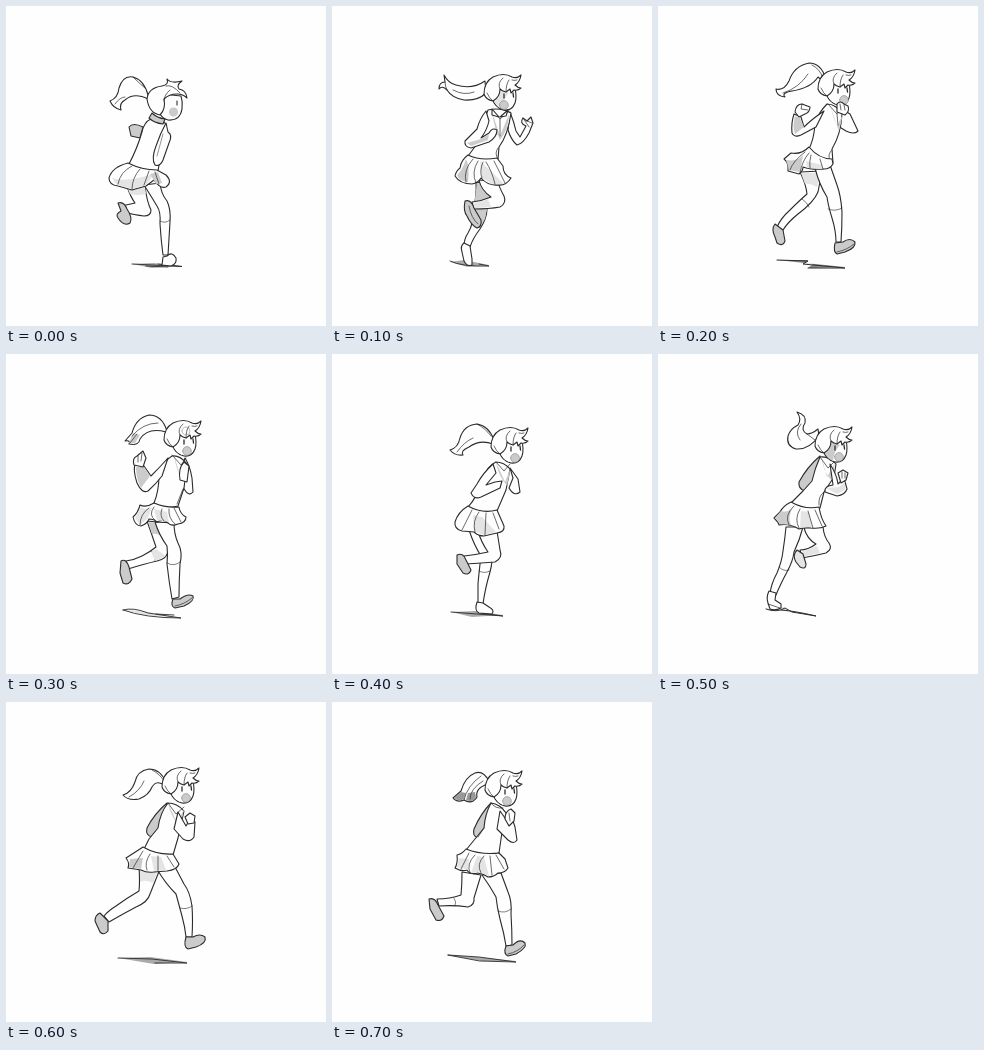
Recreate the animation shown at these times as an HTML page with a canvas. Size 320 by 320 pixels, loop 0.8 s.

```html
<!DOCTYPE html>
<html lang="en">
<head>
<meta charset="utf-8">
<title>Running girl</title>
<style>
  html, body { margin: 0; width: 100%; height: 100%; overflow: hidden; background: #fefefe; }
  canvas { display: block; width: 320px; height: 320px; }
</style>
</head>
<body>
<canvas id="stage" width="320" height="320"></canvas>
<script>
const ctx = document.getElementById('stage').getContext('2d');
const PAPER = '#fefefe', LINE = '#2b2b2b', GREY = '#cbcbcb', PALE = '#e4e4e4';
const STEP = 100;

// Closed shape with an inked outline.
function ink(d, fill = PAPER, width = 1.1) {
  tone(d, fill);
  line(d, width);
}

function tone(d, fill = GREY) {
  ctx.fillStyle = fill;
  ctx.fill(new Path2D(d));
}

function line(d, width = 0.7, color = LINE) {
  ctx.lineWidth = width;
  ctx.strokeStyle = color;
  ctx.stroke(new Path2D(d));
}

// Head in three-quarter view; mouth is its x, skin shades the near cheek.
function head(x, y, mouth, skin = PAPER) {
  ctx.save();
  ctx.translate(x, y);
  ink('M8 23Q11 33 20 35Q28 36 31 28Q33 22 31 13L13 10Z');
  tone('M9 24Q11 31 18 34Q19 24 25 18L15 14Z', skin);
  const ball = `M${mouth - 4.4} 30a4.4 4.4 0 1 0 8.8 0a4.4 4.4 0 1 0 -8.8 0`;
  tone(ball);
  line(ball, 0.5, '#777');
  line('M20 19L20 23M29 18L29.5 22', 1.3);
  ink('M0 19Q0 7 9 2Q20 -3 28 2Q33 4 37 0Q36 7 31 10Q34 13 37 13Q34 16 30 15L27 18L26 14L22 17Q18 16 16 14Q16 22 9 26Q2 25 0 19Z');
  line('M19 3Q13 8 16 14M3 18Q5 23 9 26M25 5Q22 9 22 17M28 5Q31 6 33 5');
  ctx.restore();
}

const poses = [
  () => {
    tone('M126 258L147 257L176 260L146 262Z', '#aaa');
    line('M126 258L176 260.5L152 258M140 260L162 261', 0.9);
    ink('M137 121Q127 116 123 121L125 130L134 132Z', GREY);
    ink('M121 180Q124 190 129 197Q120 199 115 200L117 206Q129 209 138 210Q145 210 145 204Q141 196 139 181Z');
    tone('M121 181L139 181L140 188Q130 190 124 188Z', PALE);
    ink('M112 197Q118 195 121 203Q127 212 124 217Q118 221 112 212Q109 208 115 205Z', GREY);
    ink('M138 179Q145 190 151 200Q155 206 154 218Q155 234 157 249L162 249Q163 232 164 216Q165 203 161 195Q155 188 154 177Z');
    line('M154 215Q159 218 164 214', 0.6);
    ink('M161 250Q166 245 170 252Q171 258 165 260L156 259L157 251Z');
    ink('M142 89Q138 74 127 71Q117 69 113 82Q112 92 104 95Q107 102 115 104Q113 97 119 94Q128 86 142 93Z');
    line('M109 98Q114 91 119 91M127 71Q133 77 140 83');
    ink('M145 113Q138 116 136 126Q131 143 123 158Q135 166 152 165L160 118Q153 111 145 113Z');
    ink('M122 157Q106 161 103 172Q103 179 112 180L126 184L140 180L148 174Q154 183 160 181Q167 176 160 169L151 164Q136 164 122 157Z');
    tone('M106 172Q118 176 136 171L148 168L140 179L126 183L111 179Z', PALE);
    tone('M144 168L152 166L156 177L150 178Z');
    line('M126 160Q114 166 112 178M134 163Q126 172 126 183M143 165L138 179M149 166L153 178');
    ink('M160 117Q154 128 150 140Q145 153 149 159Q154 161 157 154L163 137Q167 129 162 126Z');
    line('M157 128L151 150', 0.5);
    ink('M150 93Q151 111 162 114Q174 115 176 103Q177 96 175 90L156 88Z');
    tone('M163 105a4 4 0 1 0 9 2a4 4 0 1 0 -9 -2Z');
    line('M171 95L171 99', 1.1);
    ink('M141 93Q142 82 156 80Q163 79 161 73Q165 78 176 75Q170 79 173 83Q180 84 181 92Q177 88 171 88Q163 88 158 93Q160 103 154 109Q143 107 141 93Z');
    line('M160 80Q166 78 174 87M164 84Q158 89 158 95');
    ink('M146 107Q151 112 159 113L157 118Q148 117 143 112Z', GREY);
  },
  () => {
    tone('M118 256L132 254L157 259L136 261Z', '#aaa');
    line('M118 255Q130 261 157 260L147 258', 0.9);
    ink('M144 176Q145 190 141 205Q142 217 136 227Q132 233 132 240L138 241Q141 232 148 223Q155 212 155 203L161 180Z');
    tone('M145 177L160 180L155 203L153 213L147 222L141 214L142 200Z');
    ink('M132 237Q128 240 130 246L132 255Q135 261 140 259L140 253L138 240Z');
    ink('M147 174Q149 184 159 191Q150 195 140 196L142 203Q157 203 168 201Q175 197 172 190Q167 181 166 176Z');
    tone('M141 197Q149 196 156 193L159 201L143 202Z', PALE);
    ink('M133 195Q139 193 142 202L149 214Q150 221 145 222Q139 219 135 210Q131 205 133 195Z', GREY);
    line('M137 200Q139 212 146 218');
    ink('M154 87Q146 95 132 94Q120 92 115 84Q110 79 107 83Q107 76 113 76L112 69Q116 77 124 79Q140 84 153 75Z');
    line('M115 84Q113 80 113 76M121 84Q132 90 142 86', 0.7);
    ink('M178 106Q182 116 184 125L188 131L194 120Q187 117 191 112L195 115L199 111L201 117L197 127Q191 138 185 139Q179 134 176 124Z');
    line('M191 112L197 121M195 115L200 117');
    ink('M156 104Q150 119 148 134L136 150Q150 157 166 153L167 141Q176 129 179 107Q168 101 156 104Z');
    tone('M160 106L168 130L177 108Q177 123 168 134Q162 122 160 106Z');
    line('M161 105L168 113L177 105M168 113L168 130M166 142Q162 147 166 153');
    ink('M136 149Q129 154 128 162Q124 165 123 170Q128 178 140 178Q146 177 149 172Q156 180 166 179Q174 180 179 172Q171 169 171 160L165 152Q148 155 136 149Z');
    tone('M134 153Q138 160 136 176Q127 175 125 169Q130 165 134 153Z');
    tone('M148 155Q158 164 172 178L160 178L150 172Z', PALE);
    line('M141 153Q131 164 134 176M146 155Q139 166 144 177M151 156Q147 165 150 172M154 156Q160 165 163 178M162 155L173 177');
    ink('M154 105Q148 112 145 123L133 135Q132 141 139 142L157 136Q165 131 165 124Q160 121 157 127L149 132Q155 124 157 115Z');
    tone('M135 137L149 133L157 128L156 134L139 140Z');
    head(152, 69, 20, PALE);
    ink('M160 103L167 111L160 109ZM176 104L168 111L174 110Z');
  },
  () => {
    tone('M119 254L150 254L147 257L187 261L150 262L155 258Z', '#888');
    line('M119 254L150 255L145 258L187 262L150 262', 1);
    ink('M142 166Q148 178 149 188Q142 194 132 204Q123 212 119 221L125 224Q130 216 140 208Q156 196 160 186L164 165Z');
    tone('M143 167L163 167L159 181Q152 177 147 178Z', PALE);
    line('M144 193Q149 196 151 201', 0.6);
    ink('M117 218Q113 223 117 231L119 237Q125 241 127 235L125 224Z', GREY);
    ink('M157 162Q161 178 169 191Q170 199 174 212Q178 225 178 236L183 236Q184 222 184 206Q183 190 179 179L172 159Z');
    line('M170 203Q177 206 184 202', 0.6);
    ink('M177 237Q175 246 179 248L187 246Q198 242 197 236Q192 231 185 236Z', GREY);
    line('M179 246Q189 244 196 238');
    ink('M168 73Q163 57 151 57Q136 60 131 75Q126 85 118 83Q118 90 127 91Q123 87 134 85Q153 82 160 71L166 76Z');
    line('M125 87Q141 82 150 68M154 59Q162 63 165 72');
    ink('M184 103L192 108L200 125Q196 129 188 125L180 120Z');
    ink('M169 98Q160 107 157 118Q156 134 150 145Q160 158 175 157L174 143Q183 128 184 108Q178 98 169 98Z');
    tone('M172 99L179 120L185 108L181 125Q175 112 172 99Z');
    line('M170 98L179 108L182 102M174 144Q169 148 172 155M179 108L180 119');
    ink('M151 141Q143 149 133 147L126 153Q131 157 130 165L141 168Q145 165 145 161Q153 164 166 163Q172 163 175 158L174 153Q161 153 151 141Z');
    tone('M128 154Q140 156 145 149L142 166L131 164Z');
    tone('M148 155L164 159L164 163L149 162Z', PALE);
    line('M147 146Q135 155 132 164M151 147Q144 155 142 167M153 149Q151 156 152 162M162 153L165 163');
    ink('M166 105Q154 113 146 121L143 111L136 108Q133 117 134 127Q136 132 143 129L158 121Z');
    tone('M137 110L142 112L146 121L137 128Q134 121 137 110Z');
    ink('M137 106Q138 98 144 98L152 101Q152 106 147 108L141 111Z');
    line('M144 98L143 103L150 104');
    head(160, 64, 26);
    ink('M179 98Q182 94 186 98L190 100Q192 105 187 109L179 106Z');
    line('M182 98L183 104M186 99L187 104');
  },
  () => {
    tone('M117 256L138 257L175 264L140 261Z', PALE);
    line('M117 256Q127 253 142 259L175 264Q139 264 117 256M150 260L168 261', 0.9);
    ink('M141 167Q146 181 150 193Q144 198 136 202Q128 206 120 207L122 215Q138 210 151 207Q161 205 162 197L162 169Z');
    tone('M142 168L160 169L160 187Q153 178 146 180Z');
    line('M145 197Q150 201 149 207', 0.6);
    tone('M145 198L150 195L160 202L149 207Z', PALE);
    ink('M115 207Q120 204 123 213L126 225Q123 232 117 229L114 219Z', GREY);
    ink('M149 168Q153 181 161 192Q162 200 161 210Q163 228 166 245L173 243Q173 228 174 210Q177 198 172 189Q168 180 168 169Z');
    line('M161 209Q168 213 174 208', 0.6);
    ink('M167 245Q164 252 169 254L178 252Q189 247 187 242Q182 239 174 245Z', GREY);
    line('M169 252Q179 250 186 244');
    ink('M161 77Q156 61 143 61Q130 64 126 79L119 87Q125 86 123 90Q133 92 134 85Q142 73 160 78Z');
    tone('M127 79L134 81L129 89L123 89Z');
    line('M126 82Q137 69 152 69M124 89L131 80');
    ink('M179 104Q184 112 186 124L187 138Q183 143 178 135L173 119Z');
    ink('M166 102Q157 107 153 121Q153 137 148 149Q159 156 172 152L178 134L181 110Q174 101 166 102Z');
    tone('M168 101L175 125L180 108L177 128Q170 116 168 101Z');
    line('M166 101L175 111L180 104M177 135L171 150');
    ink('M148 149Q140 154 134 151Q132 159 127 163Q129 172 135 172Q141 170 143 165Q148 165 151 168Q156 165 161 168Q165 173 172 170Q180 169 180 163Q174 160 173 153Q159 154 148 149Z');
    tone('M135 153Q141 157 146 153L142 164L134 171L129 164Z', PALE);
    tone('M148 155L161 158L163 168L151 166Z', PALE);
    line('M143 154Q134 160 134 171M148 153Q142 161 149 166M156 155Q153 162 158 167M163 155Q162 164 169 170M168 154L175 168');
    ink('M162 104Q154 113 145 122L138 112L129 110Q127 117 131 129Q136 140 142 137Q150 130 156 122Z');
    tone('M130 113L138 113L144 122L135 134Q130 125 130 113Z');
    ink('M128 111Q126 104 131 102L137 97L140 104L137 113Z');
    line('M132 102L132 108M136 99L135 107');
    ink('M174 126Q172 114 178 108L183 112L181 128Z');
    head(158, 67, 23);
    line('M176 77a4 4 0 1 0 8 0a4 4 0 1 0 -8 0', 0.5, '#777');
  },
  () => {
    tone('M119 258L143 257L171 261L140 263Z', '#aaa');
    line('M119 258L171 262L148 259', 0.9);
    ink('M137 176Q142 191 149 202Q147 218 146 230L146 250L151 250Q153 235 158 218Q161 207 160 196L156 178Z');
    line('M147 217Q152 220 158 217', 0.6);
    ink('M145 248Q142 257 147 259L160 260Q163 256 157 253L151 249Z');
    ink('M146 177Q149 188 156 198Q143 201 132 202L134 210Q150 209 163 208Q171 204 168 196L165 177Z');
    ink('M125 201Q131 198 134 206L139 216Q137 222 131 219L125 210Z', GREY);
    ink('M162 86Q157 72 145 70Q132 71 128 84Q126 94 118 96Q123 102 131 101Q128 97 137 93Q148 85 161 90Z');
    line('M125 98Q132 88 141 84M145 70Q153 74 159 82');
    ink('M164 108Q155 112 150 126Q146 142 136 153Q149 162 165 157L174 136L178 115Q172 108 164 108Z');
    tone('M164 108L173 128L179 113L175 132Q166 121 164 108Z');
    line('M164 108L172 117L178 110');
    ink('M136 152Q126 158 123 168Q122 175 130 177L142 178Q146 182 152 182L165 179Q173 178 172 172L165 156Q150 160 136 152Z');
    tone('M141 161L150 163L164 178L152 181L142 177Z', PALE);
    line('M140 156L130 176M147 158Q140 167 143 178M154 159L153 181M161 159L167 175');
    ink('M161 110Q151 119 145 130L139 139Q142 146 149 143L168 134L170 127L163 128L154 131L164 119Z');
    ink('M178 114L186 125L188 138Q182 143 177 134L181 124Z');
    head(159, 74, 24);
  },
  () => {
    tone('M108 255L126 253L131 257L158 261L135 258Z', PALE);
    line('M108 255Q119 259 127 254L134 258L158 262Q137 257 123 256', 1);
    ink('M146 174Q149 185 158 190Q150 196 142 196L144 204Q156 202 168 199Q175 195 171 189Q166 183 165 173Z');
    tone('M143 198Q152 195 159 192L162 199L145 203Z', PALE);
    ink('M139 196Q134 201 138 208L142 213Q148 216 148 210L145 200Z', PALE);
    ink('M128 173Q127 184 125 197Q124 207 119 219Q113 230 112 240L118 241Q122 231 129 218Q135 207 136 198Q142 185 145 173Z');
    line('M121 213Q126 218 131 216', 0.6);
    ink('M111 237Q108 243 110 249L112 255Q117 257 123 254L123 250L117 246L118 239Z');
    line('M110 250L122 254');
    ink('M161 82Q151 96 138 95Q128 92 130 82Q132 75 140 71Q144 65 139 58Q149 61 147 69Q142 76 149 80Q154 80 160 75Z');
    line('M143 70Q136 78 142 86M149 80L157 86');
    ink('M162 102Q149 113 141 128Q140 135 147 137L160 126Z', GREY);
    ink('M162 103Q157 114 154 127L145 137L133 149Q147 158 162 154L166 138L176 123L178 110Q172 102 162 103Z');
    tone('M163 102L169 123L177 109L173 126Q165 117 163 102Z');
    line('M162 103L170 114L177 107M166 138Q160 142 161 151');
    ink('M133 148Q125 152 122 158L116 164Q121 169 121 171Q131 169 141 175Q147 173 153 174Q162 175 168 172Q163 165 161 153Q147 156 133 148Z');
    tone('M123 157Q131 159 135 153Q129 164 133 171L122 170L117 164Z');
    tone('M143 157L151 158L154 173L142 174Z', PALE);
    line('M136 152Q126 161 131 171M142 155Q136 165 141 174M150 157L155 174M157 156L164 172');
    ink('M172 110Q179 121 180 130L186 124L189 135Q187 141 179 142L167 138Q166 132 175 131Z');
    tone('M168 134L181 133L187 128L187 136L179 140Z', PALE);
    ink('M180 119L185 116L190 119L188 126L183 129Z');
    line('M184 118L184 124M187 119L187 124');
    head(157, 73, 24, GREY);
  },
  () => {
    tone('M112 256L144 255L181 260L148 262Z', '#aaa');
    line('M112 256L146 257L181 261L149 261', 0.9);
    ink('M133 165Q134 180 133 189Q121 196 110 204Q102 209 98 214L103 220Q115 213 130 205Q142 200 144 192L154 167Z');
    tone('M134 168L152 168L147 181Q140 177 134 180Z', PALE);
    ink('M94 211Q89 213 89 219L94 230Q98 234 102 229L102 219Z', GREY);
    ink('M151 167Q159 181 170 192Q173 203 176 214Q179 225 180 235L186 235Q187 218 186 204Q184 190 178 182L168 163Z');
    line('M174 206Q181 208 186 204', 0.6);
    ink('M180 235Q177 245 182 247L190 245Q201 241 199 235Q194 231 187 235Z', GREY);
    ink('M160 80Q154 67 143 67Q131 69 129 80Q125 91 117 93Q122 99 133 97Q143 93 146 85Q151 77 159 84Z');
    line('M123 95Q134 89 138 79M146 68Q154 72 158 79');
    ink('M161 101Q148 112 141 126Q139 134 147 135L158 124Z', GREY);
    ink('M162 101Q154 111 152 126L143 137L137 149Q150 156 167 153L172 136L178 109Q171 101 162 101Z');
    tone('M162 101L171 121L178 107L174 125Q165 115 162 101Z');
    line('M162 101L170 112L178 105');
    ink('M137 145Q128 151 120 156Q124 161 122 166L135 168Q141 171 148 170L161 169Q171 168 173 162L167 152Q151 153 137 145Z');
    tone('M124 157L137 156L135 167L123 165Z');
    tone('M145 154L155 155L160 168L148 169Z', PALE);
    line('M137 149L127 166M144 152Q138 161 141 168M152 154L152 169M161 154L168 165');
    ink('M172 110L180 124L184 117L189 120L188 135Q184 141 177 137L168 127Z');
    ink('M179 115L184 111L189 114L188 121L182 122Z');
    head(156, 66, 24);
  },
  () => {
    tone('M116 253L145 255L184 259L150 259Z', '#aaa');
    line('M116 253L147 255L184 260L148 259Z', 0.9);
    ink('M130 170Q130 183 129 193Q118 197 105 197L107 204Q123 203 136 205Q143 203 142 196L149 173Z');
    line('M122 196Q125 200 123 204', 0.6);
    ink('M97 197Q103 195 106 203L112 214Q110 220 104 218L98 207Z', GREY);
    ink('M150 173Q158 184 164 195Q165 205 168 217Q172 231 174 244L180 243Q180 228 179 212Q180 199 176 190L169 171Z');
    line('M166 209Q173 212 179 207', 0.6);
    ink('M174 244Q171 252 176 254L184 252Q195 246 193 241Q188 236 181 243Z', GREY);
    line('M176 252Q186 250 192 243');
    ink('M157 79Q151 68 143 71Q133 75 129 89L121 96Q125 101 132 98Q140 103 145 95Q143 86 156 82Z');
    tone('M129 90L122 96Q126 100 132 97L134 91ZM136 91L134 98Q141 101 144 95L143 90Z', '#999');
    line('M132 98Q135 84 149 74M138 97Q138 87 151 79');
    ink('M159 101Q149 111 142 127Q140 134 146 136L156 123Z', GREY);
    ink('M159 101Q153 112 152 126L143 137L134 148Q149 156 167 151L170 130L174 111Q168 102 159 101Z');
    line('M159 101Q163 107 171 106M152 126L146 135');
    ink('M134 147Q130 152 125 153Q126 161 123 166Q130 170 135 168Q138 173 146 171Q152 172 156 175Q162 175 166 171Q173 171 176 166L173 157L167 151Q149 153 134 147Z');
    tone('M127 156L137 157L136 168L125 165Z', PALE);
    tone('M145 154L152 155L157 174L149 170L139 171Z', PALE);
    line('M137 151L129 167M143 153Q134 162 138 171M152 154Q144 162 149 171M158 154L160 173M164 153L172 167');
    ink('M168 109Q174 117 177 123L180 116L183 125L185 138Q182 143 176 138L165 127Z');
    ink('M173 117Q173 109 179 107L183 111L182 119L177 124Z');
    line('M177 111L178 119');
    head(153, 69, 22);
  }
];

let shown = -1;
function frame() {
  const i = Math.floor(performance.now() / STEP) % poses.length;
  if (i !== shown) {
    shown = i;
    ctx.fillStyle = PAPER;
    ctx.fillRect(0, 0, 320, 320);
    ctx.lineJoin = ctx.lineCap = 'round';
    poses[i]();
  }
  requestAnimationFrame(frame);
}
frame();
</script>
</body>
</html>
```
